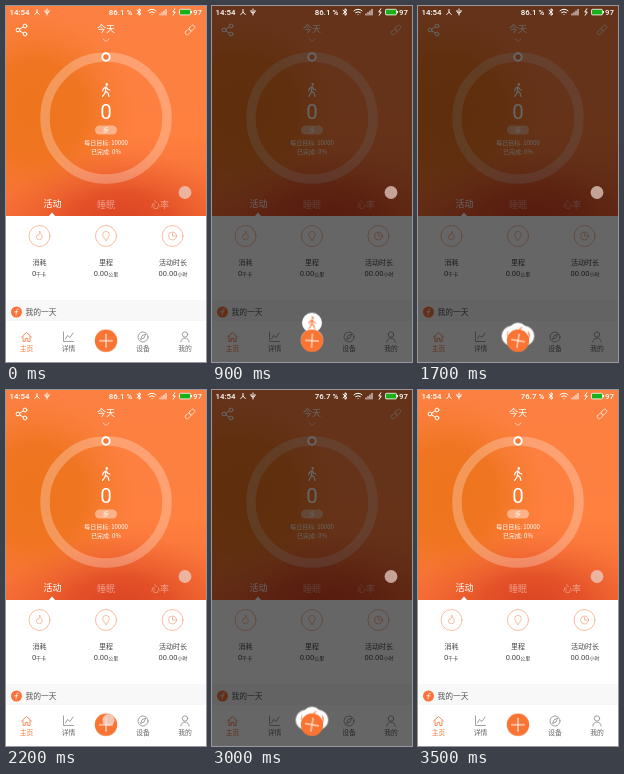
Recreate the animation shown at these times as an HTML page. Size 200x356 px, loop 3600 ms.

```html
<!DOCTYPE html>
<html lang="zh-CN">
<head>
<meta charset="utf-8">
<title>活动</title>
<style>
html, body { margin: 0; width: 100%; height: 100%; overflow: hidden; background: #fff; }
svg { display: block; width: 100vw; height: 100vh; }
text { font-family: "Noto Sans CJK SC", "Noto Sans CJK", "Noto Sans", sans-serif; text-anchor: middle; }
.num { font-family: Roboto, "Noto Sans CJK SC", sans-serif; }
.line { fill: none; stroke-linecap: round; stroke-linejoin: round; }
.white { stroke: #fff; }
.orange { stroke: #f9753a; }
.gray { stroke: #888; }

.shade, .touch, .mid, .side, .spin, .cross, .before, .after {
  animation: 3.6s step-end infinite;
}
.shade { animation-name: shade; }
.touch { animation-name: touch; }
.mid { animation-name: mid; }
.side { animation-name: side; }
.spin { animation-name: spin; }
.cross { animation-name: cross; }
.before { animation-name: before; }
.after { animation-name: after; }

@keyframes shade {
  0%, 50%, 86.11%, 100% { opacity: 0; }
  25%, 63.88% { opacity: 1; }
}
@keyframes touch {
  0%, 25%, 41.66%, 63.88%, 80.55%, 100% { opacity: 0; }
  19.44%, 38.88%, 61.11%, 77.77% { opacity: .75; }
}
@keyframes mid {
  0%, 50%, 86.11%, 100% { transform: translateY(0); }
  25%, 63.88% { transform: translateY(-18px); }
  27.77%, 66.66% { transform: translateY(-50px); }
  30.55%, 69.44% { transform: translateY(-67px); }
  33.33%, 72.22% { transform: translateY(-63px); }
  41.66%, 77.77% { transform: translateY(-56px); }
  44.44%, 80.55% { transform: translateY(-29px); }
  47.22%, 83.33% { transform: translateY(-8px); }
}
@keyframes side {
  0%, 50%, 86.11%, 100% { transform: translateY(0); }
  25%, 63.88% { transform: translateY(-1.5px); }
  27.77%, 66.66% { transform: translateY(-32px); }
  30.55%, 69.44% { transform: translateY(-60px); }
  33.33%, 72.22% { transform: translateY(-63px); }
  41.66%, 77.77% { transform: translateY(-56px); }
  44.44%, 80.55% { transform: translateY(-29px); }
  47.22%, 83.33% { transform: translateY(-8px); }
}
@keyframes spin {
  0%, 33.33%, 50%, 72.22%, 86.11%, 100% { transform: rotate(0); }
  41.66%, 77.77% { transform: rotate(-15deg); }
  44.44%, 80.55% { transform: rotate(-48deg); }
  47.22%, 83.33% { transform: rotate(-120deg); }
}
@keyframes cross {
  0%, 50%, 86.11%, 100% { transform: rotate(0); }
  25%, 63.88% { transform: rotate(4deg); }
  27.77%, 66.66% { transform: rotate(22deg); }
  30.55%, 69.44% { transform: rotate(38deg); }
  33.33%, 72.22% { transform: rotate(45deg); }
  41.66%, 77.77% { transform: rotate(42deg); }
  44.44%, 80.55% { transform: rotate(30deg); }
  47.22%, 83.33% { transform: rotate(10deg); }
}
@keyframes before { 0% { opacity: 1; } 77.77%, 100% { opacity: 0; } }
@keyframes after { 0% { opacity: 0; } 77.77%, 100% { opacity: 1; } }
</style>
</head>
<body>
<svg viewBox="0 0 200 356" preserveAspectRatio="none">
  <defs>
    <linearGradient id="sky" x1="0" y1="0" x2="0" y2="1">
      <stop offset="0" stop-color="#fc8042"/>
      <stop offset=".6" stop-color="#ff803f"/>
      <stop offset="1" stop-color="#f56c35"/>
    </linearGradient>
    <radialGradient id="amber" gradientUnits="userSpaceOnUse" cx="30" cy="105" r="100">
      <stop offset="0" stop-color="#ee741c"/>
      <stop offset=".5" stop-color="#ef741f" stop-opacity=".9"/>
      <stop offset="1" stop-color="#f47a2c" stop-opacity="0"/>
    </radialGradient>
    <radialGradient id="ember" gradientTransform="translate(115 215) scale(125 72)" gradientUnits="userSpaceOnUse" cx="0" cy="0" r="1">
      <stop offset="0" stop-color="#da4423"/>
      <stop offset=".4" stop-color="#e04c26" stop-opacity=".85"/>
      <stop offset="1" stop-color="#ee6530" stop-opacity="0"/>
    </radialGradient>
    <g id="walker" class="line" stroke-width="1.2">
      <circle cx=".8" cy="-5.6" r=".7"/>
      <path d="M0-3.2 -.5 1 2 3 3 6.5M-.5 1-1.3 3.5-3.4 6.3M0-3.2-2.8-1.2-3.2.8M.3-3 1.7-.7 3.8 0"/>
    </g>
  </defs>

  <!-- header -->
  <rect width="200" height="210" fill="url(#sky)"/>
  <rect width="200" height="210" fill="url(#amber)"/>
  <rect width="200" height="210" fill="url(#ember)"/>
  <g class="line white" stroke-width="1">
    <circle cx="12" cy="24" r="1.9"/><circle cx="19" cy="20" r="1.9"/><circle cx="19" cy="28" r="1.9"/>
    <path d="M13.7 23 17.3 21M13.7 25 17.3 27"/>
    <g transform="translate(184 24) rotate(-45)" stroke-width=".8" opacity=".75">
      <rect x="-6" y="-2" width="6.3" height="4" rx="2"/>
      <rect x="-.3" y="-2" width="6.3" height="4" rx="2"/>
    </g>
    <path d="M97 33 100 35.5 103 33" stroke-width=".7" opacity=".8"/>
  </g>
  <text x="100" y="25.5" font-size="9" fill="#fff">今天</text>

  <circle cx="100" cy="112" r="61" fill="none" stroke="#fff" stroke-opacity=".26" stroke-width="9.5"/>
  <circle cx="100" cy="51" r="3.7" fill="#f47b38" stroke="#fff" stroke-width="2"/>
  <use href="#walker" x="100" y="84" class="white"/>
  <text class="num" x="100" y="113" font-size="20.5" fill="#fff">0</text>
  <rect x="89" y="119.5" width="22" height="9" rx="4.5" fill="#fff" fill-opacity=".42"/>
  <g fill="#fff">
    <text x="100" y="126.3" font-size="6">步</text>
    <text x="100" y="139.3" font-size="6">每日目标: 10000</text>
    <text x="100" y="147.7" font-size="6">已完成: 0%</text>
    <text x="46.5" y="200.5" font-size="9">活动</text>
    <g font-size="9" opacity=".45">
      <text x="100" y="201.5">睡眠</text>
      <text x="154" y="201.5">心率</text>
    </g>
    <path d="M42.5 210.5 46 206.5 49.5 210.5Z"/>
  </g>

  <!-- statistics -->
  <rect y="210" width="200" height="84" fill="#fff"/>
  <g class="line" stroke="#f9a07a" stroke-width=".7">
    <circle cx="33.5" cy="230" r="10.5"/>
    <circle cx="100" cy="230" r="10.5"/>
    <circle cx="166.5" cy="230" r="10.5"/>
    <path d="M33.8 225.5C34.4 227.7 36.4 229 36.3 231.3A3 3 0 0 1 30.4 231.3C30.4 230 31 229.3 31.5 228.5L32.4 229.3Q33.9 227.8 33.8 225.5Z"/>
    <path d="M100 234.5C98.2 231.8 96.7 230.5 96.7 228.7A3.3 3.3 0 0 1 103.3 228.7C103.3 230.5 101.8 231.8 100 234.5Z"/>
    <circle cx="166.5" cy="230" r="4"/>
    <path d="M166.5 227V230H169.5"/>
  </g>
  <g font-size="7" fill="#444">
    <text x="33.5" y="258.5">消耗</text>
    <text x="100" y="258.5">里程</text>
    <text x="167" y="258.5">活动时长</text>
  </g>
  <g font-size="7.5" fill="#444">
    <text class="num" x="33" y="269.8">0<tspan font-size="5">千卡</tspan></text>
    <text class="num" x="100" y="269.8">0.00<tspan font-size="5">公里</tspan></text>
    <text class="num" x="167" y="269.8">00.00<tspan font-size="5">小时</tspan></text>
  </g>
  <rect y="294" width="200" height="21" fill="#f8f8f8"/>
  <circle cx="10.5" cy="306" r="5.5" fill="#f9733a"/>
  <path d="M12.3 303Q10.7 302.7 10.5 305L10 309M8.8 305.8H12" class="line white" stroke-width=".7"/>
  <text x="35" y="309" font-size="7.8" fill="#555">我的一天</text>

  <!-- navigation -->
  <rect y="314" width="200" height="42" fill="#fff"/>
  <path d="M0 314.3H200" stroke="#eee" stroke-width=".6"/>
  <g class="line" stroke-width=".8">
    <path class="orange" d="M15.5 331 20.5 326.5 25.5 331M17 330.5V335.5H19.2V332.3H21.8V335.5H24V330.5"/>
    <g class="gray">
      <path d="M57.5 326V335.5H67.5M59.5 333 61.5 329.5 64 331.5 67 327"/>
      <circle cx="137" cy="331" r="5"/>
      <path d="M139.5 328.5 138 332 134.5 333.5 136 330Z"/>
      <circle cx="179" cy="328.5" r="2.7"/>
      <path d="M174.8 336C175 330.7 183 330.7 183.2 336"/>
    </g>
  </g>
  <g font-size="6.8" fill="#666">
    <text x="20.5" y="345" fill="#f9753a">主页</text>
    <text x="62.5" y="345">详情</text>
    <text x="137" y="345">设备</text>
    <text x="179" y="345">我的</text>
  </g>

  <rect class="shade" width="200" height="356" fill="#000" fill-opacity=".6"/>

  <!-- status bar -->
  <g fill="#fff" font-size="7.9" font-weight="500">
    <text class="num" x="13.5" y="9">14:54</text>
    <text class="num before" x="114.5" y="9">86.1 %</text>
    <text class="num after" x="114.5" y="9">76.7 %</text>
    <text class="num" x="191.5" y="9">97</text>
  </g>
  <g class="line white" stroke-width="1">
    <path d="M31 3.5V6.2L28.8 8.5M31 6.2 33.3 8.5M41 3V9M39 4.5V6L41 7.2 43 6V4.5"/>
    <path d="M131 4.2 135 7.8 133 9.3V2.8L135 4.3 131 7.8"/>
    <path d="M142 4.8Q146 1.5 150 4.8M143.6 6.6Q146 4.7 148.4 6.6M146 8.6H146.1"/>
    <path d="M154 9V8M156 9V6.6M158 9V5M160 9V3.4"/>
    <path d="M168.8 2.8 166.8 6H169.2L167.2 9.2"/>
  </g>
  <rect x="173.5" y="3.3" width="11" height="5.6" rx="1" fill="#1bb01b" stroke="#fff" stroke-width=".8"/>
  <rect x="185" y="5" width="1" height="2.2" fill="#fff"/>

  <circle cx="179" cy="186.5" r="6.4" fill="#ecd2cb" fill-opacity=".72"/>

  <!-- radial menu -->
  <g transform="translate(100 334.7)">
    <g class="shade">
      <g transform="rotate(-53)"><g class="side"><g transform="rotate(53)">
        <circle r="10" fill="#fff"/>
        <g class="spin">
          <path class="line orange" stroke-width="1.5" d="M-3 0H3M-3-3V3M3-3V3M-5-1.5V1.5M5-1.5V1.5"/>
        </g>
      </g></g></g>
      <g transform="rotate(52)"><g class="side"><g transform="rotate(-52)">
        <circle r="10" fill="#fff"/>
        <g class="spin">
          <path class="line orange" stroke-width="1.3" d="M.5-5A5 5 0 1 0 5 1.5A4.3 4.3 0 0 1 .5-5Z"/>
        </g>
      </g></g></g>
      <g class="mid">
        <circle r="10" fill="#fff"/>
        <g class="spin"><use href="#walker" class="orange" transform="scale(.9)"/></g>
      </g>
    </g>
    <circle r="11.2" fill="#fa7434"/>
    <g class="cross"><path class="line white" stroke-width="1" d="M-6.5 0H6.5M0-6.5V6.5"/></g>
    <circle class="touch" cx="2.5" cy="-4.7" r="6" fill="#f0e2de"/>
  </g>
</svg>
</body>
</html>
```
